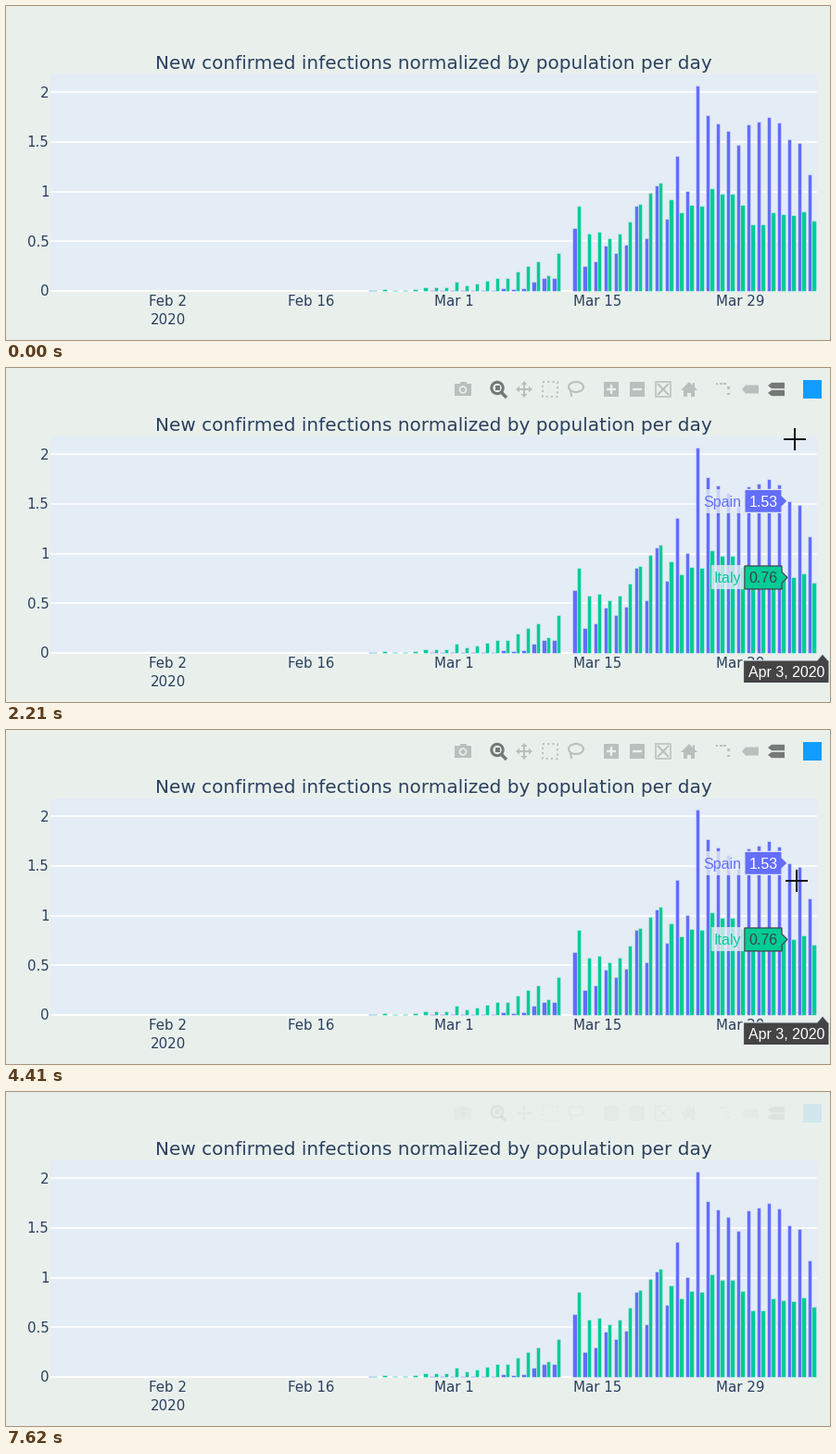
A matplotlib script for the animation above (7780 ms loop, 889x361 px).

```python
import numpy as np
import matplotlib.pyplot as plt
from matplotlib.animation import FuncAnimation
from matplotlib.collections import PolyCollection
from matplotlib.patches import Ellipse, FancyBboxPatch, Polygon

W, H, DPI = 889, 361, 64
LOOP, STEP, HOLD = 7780, 20, 77
PAPER, PLOT, INK = "#e9f0ec", "#e4ecf6", "#2a3f5f"
BLUE, GREEN, DARK = "#636efa", "#00cc96", "#444444"
IDLE, ACTIVE = "#b9bfbc", "#747876"
LEFT, RIGHT, TOP, BASE = 48, 875, 74, 308
DAY = (RIGHT - LEFT) / 75
UNIT = 107.3

FIRST = 31
SPAIN = [.01] + [0] * 5 + [.01] * 7 + [
    .03, .02, .03, .09, .13, .13, 0, .63, .25, .3, .46, .38, .47, .86, .53, 1.06, .73, 1.36,
    1.01, 2.07, 1.77, 1.69, 1.61, 1.47, 1.68, 1.71, 1.75, 1.7, 1.53, 1.49, 1.17]
ITALY = [.01, .02, .01, .01, .02] + [.04] * 3 + [
    .09, .06, .07, .1, .13, .13, .2, .25, .3, .16, .38, 0, .86, .58, .6, .53, .58, .7, .88, .99,
    1.09, .92, .79, .87, .86, 1.03, .98, .98, .87, .67, .67, .79, .77, .76, .8, .71]

# Cursor moves: start ms, number of steps, x and y reached
ENTRY = (850, 375)
MOVES = [
    (440, 10, 838, 66), (1220, 2, 835, 25), (1660, 1, 840, 13), (1740, 1, 836, 25),
    (1910, 1, 835, 24), (2130, 2, 851, 77), (2286, 4, 830, 110), (2598, 4, 796, 124),
    (2920, 2, 806, 140), (3080, 2, 818, 150), (3240, 1, 835, 154), (3400, 1, 837, 155),
    (3560, 4, 838, 159), (4020, 4, 850, 163), (4410, 1, 852.7, 163), (4490, 2, 858, 157),
    (4740, 10, 822, 174), (5520, 3, 816, 176), (5900, 2, 812, 183), (6210, 4, 819, 196),
    (6520, 6, 824, 228), (6990, 5, 832, 390),
]
ARROW = [(0, 0), (0, 16), (3.7, 12.5), (6.2, 18), (8.4, 17), (6, 11.6), (11, 11.6)]
HAND = [(-1.7, 1), (0, 0), (1.7, 1), (1.7, 7.5), (8, 9), (11, 11), (11, 16), (9, 22), (0, 22),
        (-6.5, 14), (-5, 12), (-1.7, 14)]

fig = plt.figure(figsize=(W / DPI, H / DPI), dpi=DPI, facecolor=PAPER)
ax = fig.add_axes([0, 0, 1, 1])
ax.set(xlim=(0, W), ylim=(H, 0))
ax.axis("off")


def px(size):
    return size * 72 / DPI


def write(x, y, text, size, color=INK, font="DejaVu Sans", ha="center", z=1):
    return ax.text(x, y, text, fontsize=px(size), color=color, family=font, ha=ha,
                   va="baseline", zorder=z)


def poly(points, face, edge="none", width=0, z=2):
    return ax.add_patch(Polygon(points, facecolor=face, edgecolor=edge,
                                linewidth=px(width), zorder=z))


def corners(x, y, rx, ry):
    return [(x - rx, y - ry), (x + rx, y - ry), (x + rx, y + ry), (x - rx, y + ry)]


def block(x, y, rx, ry, face=IDLE, z=2):
    return poly(corners(x, y, rx, ry), face, z=z)


def frame(x, y, r, width, style="-"):
    patch = poly(corners(x, y, r, r), "none", IDLE, width)
    patch.set_linestyle(style)
    return patch


def stroke(x, y, dx, dy, color=IDLE, width=2, z=2):
    """Straight line centred on (x, y)."""
    return ax.plot([x - dx, x + dx], [y - dy, y + dy], color=color, lw=px(width),
                   zorder=z, solid_capstyle="butt")[0]


def oval(x, y, rx, ry, face, edge="none", width=0):
    return ax.add_patch(Ellipse((x, y), 2 * rx, 2 * ry, facecolor=face, edgecolor=edge,
                                linewidth=px(width), zorder=3))


def center(day):
    return LEFT + DAY * (day + .5)


def level(value):
    return BASE - UNIT * value


def draw_chart():
    mid, half = (LEFT + RIGHT) / 2, (RIGHT - LEFT) / 2
    block(mid, (TOP + BASE) / 2, half, (BASE - TOP) / 2, PLOT, z=0)
    for value in np.arange(5) / 2:
        stroke(mid, level(value), half, 0, "white", 1.6 if value else 2, z=.5)
        write(46.5, level(value) + 5.3, f"{value:g}", 15, ha="right")
    for day, name in zip(range(11, 75, 14), ("Feb 2", "Feb 16", "Mar 1", "Mar 15", "Mar 29")):
        write(center(day), 324, name, 15)
    write(center(11), 344, "2020", 15)
    write(mid, 68, "New confirmed infections normalized by population per day", 20)
    width = DAY * .4
    for values, side, color in ((SPAIN, -.5, BLUE), (ITALY, .5, GREEN)):
        bars = [corners(center(FIRST + i) + side * width, BASE - UNIT * v / 2,
                        width / 2, UNIT * v / 2)
                for i, v in enumerate(values) if v]
        ax.add_collection(PolyCollection(bars, facecolors=color, edgecolors=PLOT,
                                         linewidths=px(.5), zorder=1))


def tag(x, y, r):
    return poly([(x, y), (x + 4, y - r), (x + 18, y - r), (x + 18, y + r), (x + 4, y + r)], IDLE)


def draw_modebar():
    y = 23
    parts = [
        block(493, 23.5, 9, 6.5), block(493, 17, 3.5, 2),
        oval(493, 23.5, 4.3, 4.3, PAPER), oval(493, 23.5, 2.6, 2.6, IDLE),
        oval(530, 21.5, 6.2, 6.2, "none", ACTIVE, 3), block(530, 21.5, 2.5, 2.5, ACTIVE),
        stroke(537, 29, 3, 3, ACTIVE, 3.5),
        stroke(559, y, 7, 0), stroke(559, y, 0, 7),
        frame(587, y, 8, 2, ":"),
        oval(615, 20.5, 8, 5.5, "none", IDLE, 2), stroke(609.5, 27.5, .7, 3.5),
        block(653, y, 8, 8), block(681, y, 8, 8),
        stroke(653, y, 5, 0, PAPER, 2.4), stroke(653, y, 0, 5, PAPER, 2.4),
        stroke(681, y, 5, 0, PAPER, 2.4),
        frame(709, y, 8, 1.5), stroke(709, y, 6, 6), stroke(709, y, 6, -6),
        poly([(728, 24), (737, 15), (746, 24)], IDLE), block(742, 18, 1.2, 2.5),
        block(733, 27, 2.3, 3.5), block(741, 27, 2.3, 3.5), block(737, 25, 3, 1.5),
        block(870, y, 10, 10, "#119dff"),
    ]
    for turn in range(4):
        out = np.array([(1, 0), (0, 1), (-1, 0), (0, -1)][turn])
        tip, side = out * 9 + (559, y), out[::-1] * 3.5
        parts.append(poly([tip, tip - 4 * out + side, tip - 4 * out - side], IDLE))
    parts += [block(767 + 4.4 * k, 17, 1.4, 1.4) for k in range(3)]
    parts += [block(779.5, 21.5 + 6.5 * k, 1.4, 1.4) for k in range(2)]
    closest = [tag(794, y, 4.5)]
    compare = [tag(822, y + d, 3.2) for d in (-4, 4)]
    return parts + closest + compare, closest, compare


def cursor_at(t):
    pos = np.array(ENTRY, float)
    for start, steps, x, y in MOVES:
        if t < start:
            break
        progress = min(1 + (t - start) // HOLD, steps) / steps
        pos = pos + (np.array([x, y]) - pos) * progress
    return pos


def value_label(day, value, name, name_width, color, edge, text_color):
    tip, y, text = center(day) - DAY * .4, level(value), f"{value:g}"
    right = tip - 6
    left = right - (8.9 * (len(text) - 1) + 4.45) - 9
    reach = (name_width + 7) / 2
    veil = block(left - reach, y, reach, 13, PLOT, z=6)
    veil.set_alpha(.8)
    return [
        veil,
        poly([(tip, y), (right, y - 6), (right, y - 12.5), (left, y - 12.5),
              (left, y + 12.5), (right, y + 12.5), (right, y + 6)], color, edge, 1.2, z=7),
        write(left + 4.5, y + 5.7, text, 16, text_color, "Liberation Sans", "left", z=8),
        write(left - 4, y + 5.7, name, 16, color, "Liberation Sans", "right", z=8),
    ]


def date_label(day):
    text = f"Mar {day - 38}, 2020" if day < 70 else f"Apr {day - 69}, 2020"
    half, x = len(text) * 4.2, center(day)
    mid = min(x, 888 - half)
    tip, top, bottom = x if mid == x else 881, 316, 340.5
    box = [(tip, 309), (tip + 6, top), (mid + half, top), (mid + half, bottom),
           (mid - half, bottom), (mid - half, top), (tip - 6, top)]
    return [poly(box, DARK, PLOT, 1, z=7),
            write(mid, 334, text, 16, "white", "Liberation Sans", z=8)]


def tooltip():
    slate = "#69738a"
    box = FancyBboxPatch((653, 39), 199, 30, boxstyle="round,pad=2,rounding_size=2",
                         facecolor=slate, edgecolor="none", zorder=9)
    return [ax.add_patch(box), poly([(831, 31), (837, 38), (825, 38)], slate, z=9),
            write(752.5, 59, "Compare data on hover", 15, "white", z=10)]


def pointer(x, y, over_plot, over_button):
    if over_plot:
        return [stroke(x, y, 12, 0, "#111111", z=12), stroke(x, y, 0, 12, "#111111", z=12)]
    outline = HAND if over_button else ARROW
    return [poly([(x + dx, y + dy) for dx, dy in outline], "white", "black", 1.2, z=12)]


draw_chart()
modebar, closest_icon, compare_icon = draw_modebar()
live = []


def draw(n):
    t = n * STEP + STEP / 2
    while live:
        live.pop().remove()

    fade = np.interp(t, [440, 740, 7330, 7620], [0, 1, 1, .1])
    for part in modebar:
        part.set_visible(fade > 0)
        part.set_alpha(fade)
    comparing = t >= 1300
    for part in closest_icon:
        part.set_facecolor(IDLE if comparing else ACTIVE)
    for part in compare_icon:
        part.set_facecolor(ACTIVE if comparing else IDLE)

    x, y = cursor_at(t)
    over_plot = LEFT <= x <= RIGHT and TOP <= y <= BASE
    over_button = 1220 <= t < 2130
    if over_button:
        live.extend(tooltip())
    if over_plot and comparing:
        day = int((x - LEFT) / DAY)
        i = day - FIRST
        live.extend(value_label(day, SPAIN[i], "Spain", 41, BLUE, PLOT, "white"))
        live.extend(value_label(day, ITALY[i], "Italy", 29.3, GREEN, DARK, DARK))
        live.extend(date_label(day))
    if y < H:
        live.extend(pointer(x, y, over_plot, over_button))
    return live


anim = FuncAnimation(fig, draw, frames=LOOP // STEP, interval=STEP, repeat=True,
                     repeat_delay=0, cache_frame_data=False)
plt.show()
```
